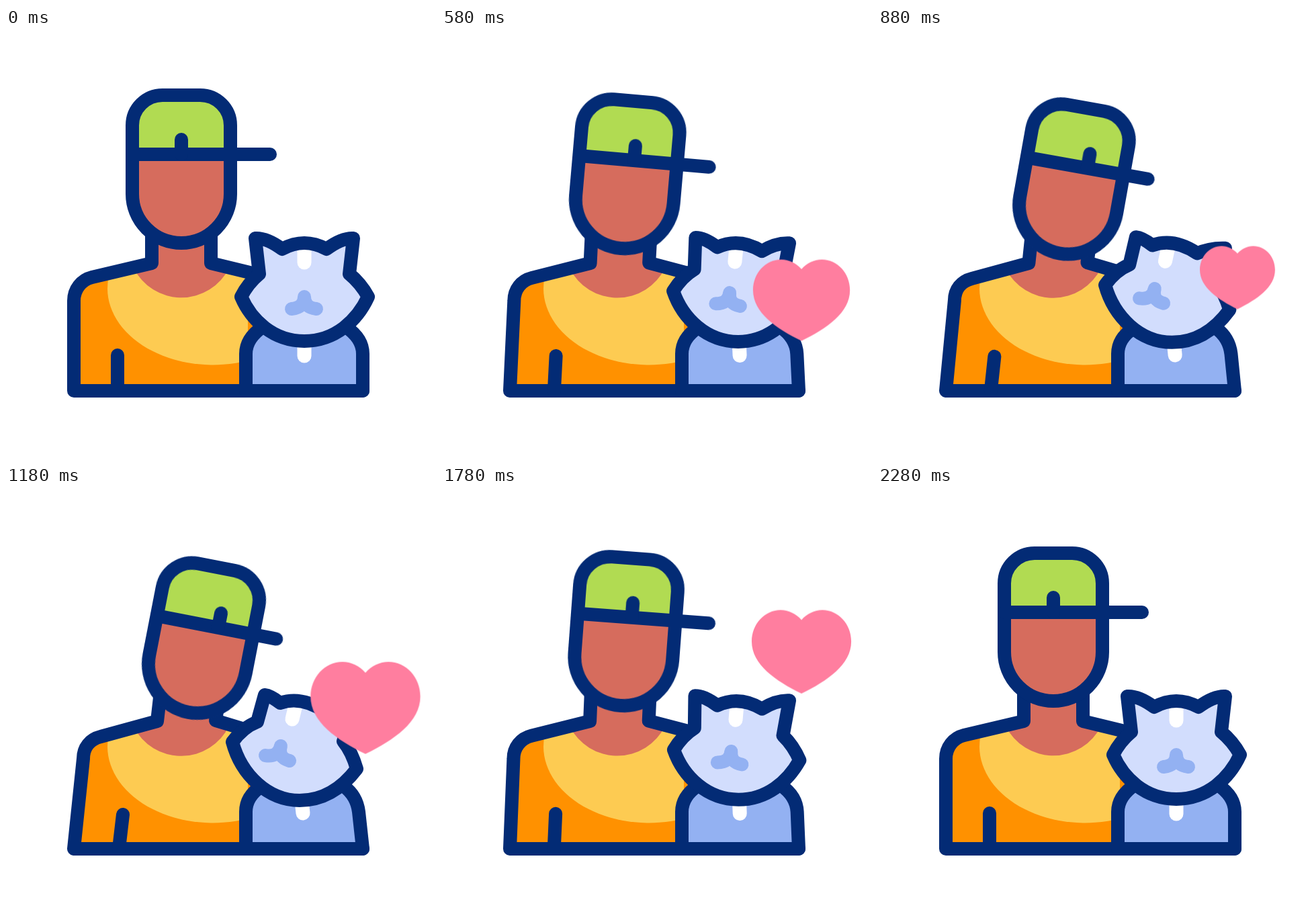
Animation of 640 by 640 pixels, one loop 2.4 s. Source, as an HTML page:

```html
<!DOCTYPE html>
<html lang="en">
<head>
<meta charset="utf-8">
<title>A boy and his cat</title>
<style>
  html, body { margin: 0; width: 100%; height: 100%; overflow: hidden; background: #fff; }
  svg { display: block; width: 100%; height: 100%; }

  :root { --navy: #032b75; --mist: #d2ddfd; --sky: #93b1f2; }

  .ink { stroke: var(--navy); stroke-width: 20; }
  .nose { stroke: var(--sky); stroke-width: 20; }
  .stripe { stroke: #fff; stroke-width: 21; }
  .none { fill: none; }

  /* --a is the upright pose, --b the leaning one */
  .lean { d: var(--a); animation: lean 2.4s cubic-bezier(.667, 0, .333, 1) infinite; }
  @keyframes lean {
    0%, 95%, 100% { d: var(--a); }
    50% { d: var(--b); }
  }

  .torso {
    --a: path("M217 310L217 350L128 371C112 375 101 389 101 406L101 540L531 540");
    --b: path("M229 315L225 350L141 373C125 377 115 389 115 406L101 540L531 540");
  }
  .shoulder {
    --a: path("M305 310L305 350L375 367");
    --b: path("M316 322L312 349L365 365");
  }
  .neck {
    --a: path("M217 300L217 350L190 357A79 79 0 0 0 332 357L305 350L305 300Z");
    --b: path("M229 300L225 350L190 358A79 79 0 0 0 332 357L312 349L316 300Z");
  }
  .arm {
    --a: path("M166 487L166 540");
    --b: path("M174 489L168 540");
  }
  .brim {
    --a: path("M188 188L393 188");
    --b: path("M188 188L369 188");
  }
  .button {
    --a: path("M261 166L261 188");
    --b: path("M281 166L281 188");
  }
  .cat-body {
    --a: path("M357 540L357 485Q357 462 382 445L506 445Q531 462 531 485L531 540Z");
    --b: path("M357 540L357 485Q357 462 380 447L503 447Q522 461 525 485L531 540Z");
  }
  .chest {
    --a: path("M444 466L444 488");
    --b: path("M440 468L442 487");
  }
  .cat-head {
    --a: path("M350 400Q360 380 377 366L371 313Q388 312 411 329Q444 311 477 329Q500 312 517 313L511 366Q528 380 539 400C523 435 490 466 444 466C398 466 365 435 350 400Z");
    --b: path("M337 381Q353 359 374 351L385 311Q394 312 408 323Q440 312 475 336Q494 328 517 329L502 380Q515 396 522 421C500 450 472 468 437 468C390 468 350 430 337 381Z");
  }
  .brow {
    --a: path("M444 320L444 349");
    --b: path("M432 322L426 347");
  }
  .nose {
    --a: path("M425 418Q444 416 444 400Q444 416 462 418");
    --b: path("M386 401Q405 404 409 387Q404 404 422 409");
  }

  .head {
    transform-origin: 261px 247px;
    animation: nod 2.4s cubic-bezier(.667, 0, .333, 1) infinite;
  }
  @keyframes nod {
    0%, 95%, 100% { transform: translate(0, 0) rotate(0deg); }
    50% { transform: translate(24px, 18px) rotate(11deg); }
  }

  .rise { animation: rise 2.4s cubic-bezier(.333, 0, .667, 1) .1s infinite both; }
  @keyframes rise {
    from { transform: translate(535px, 429.5px); }
    to { transform: translate(535px, 196.5px); }
  }

  .beat { animation: beat 2.4s cubic-bezier(.3, .2, .7, .8) infinite; }
  @keyframes beat {
    0%, 9.8% { transform: scale(0); }
    22.3% { transform: scale(.926); }
    34.8% { transform: scale(.64); }
    47.3% { transform: scale(1.045); }
    59.8% { transform: scale(.75); }
    72.3% { transform: scale(1.045); }
    84.8%, 100% { transform: scale(0); }
  }
</style>
</head>
<body>
<svg viewBox="0 0 640 640" stroke-linecap="round" stroke-linejoin="round">
  <path class="lean torso" fill="#ff9100"/>
  <path fill="#fdcb52" d="M152 370L151 388A157 114 0 0 0 360 495V366L305 350H217Z"/>
  <path class="lean neck" fill="#d66c5d"/>
  <g class="ink none">
    <path class="lean torso"/>
    <path class="lean shoulder"/>
    <path class="lean arm"/>
  </g>

  <g class="head">
    <path fill="#d66c5d" d="M188 188V247A73 73 0 0 0 334 247V188Z"/>
    <path fill="#b1db52" d="M188 188V145A45 45 0 0 1 233 100H289A45 45 0 0 1 334 145V188Z"/>
    <g class="ink none">
      <path d="M188 145A45 45 0 0 1 233 100H289A45 45 0 0 1 334 145V247A73 73 0 0 1 188 247Z"/>
      <path class="lean brim"/>
      <path class="lean button"/>
    </g>
  </g>

  <path class="lean cat-body ink" fill="#93b1f2"/>
  <path class="lean chest stripe none"/>
  <path class="lean cat-head" fill="#d2ddfd"/>
  <path class="lean brow stripe none"/>
  <path class="lean nose none"/>
  <path class="lean cat-head ink none"/>

  <g class="rise">
    <path class="beat" fill="#ff7e9f" d="M0-52C-9-62-21-68-34-68C-60-68-81-45-81-17C-81 21-42 47 0 68C42 47 81 21 81-17C81-45 60-68 34-68C21-68 9-62 0-52Z"/>
  </g>
</svg>
</body>
</html>
```
